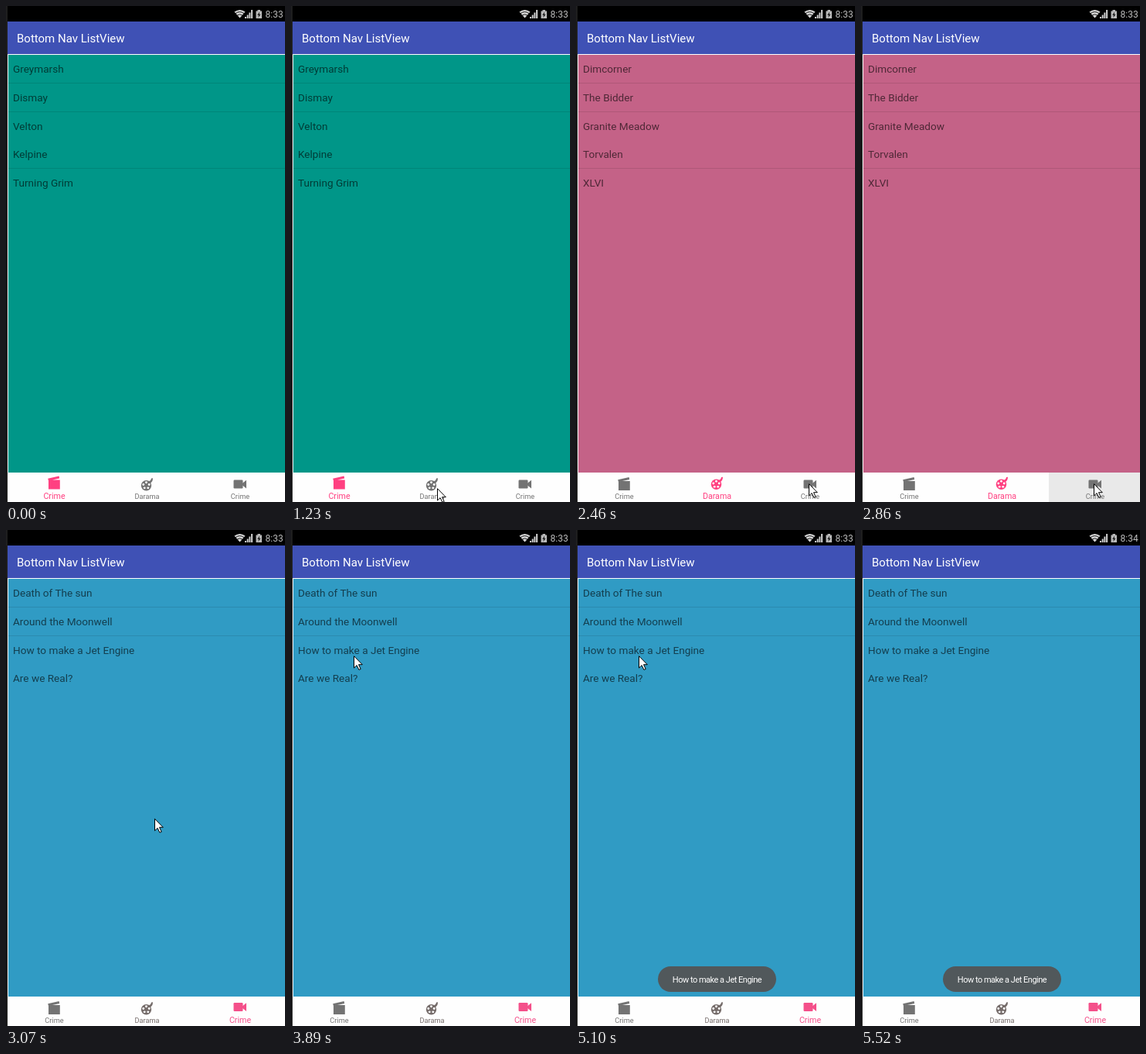
An HTML page for the animation above (6.32 s loop, 361 by 640 pixels).

```html
<!DOCTYPE html>
<html lang="en">
<head>
<meta charset="utf-8">
<title>Bottom Nav ListView</title>
<style>
  html, body { margin: 0; width: 100%; height: 100%; overflow: hidden; background: #fff; }
  svg { display: block; font-family: Roboto, "Noto Sans", sans-serif; }
  .row { font-size: 13.6px; fill: #000; fill-opacity: .6; }
  .tab { fill: currentColor; }
  .tab text { font-size: 9.2px; text-anchor: middle; }
  .tab.on text { font-size: 10.7px; transform: translateY(-.5px); }
  .tab.on .icon { transform: translateY(-1.5px); }
</style>
</head>
<body>
<svg width="361" height="640" viewBox="0 0 361 640">
  <rect width="361" height="640" fill="#fff"/>

  <!-- status bar -->
  <rect width="361" height="20" fill="#000"/>
  <path d="M302.5 15.5 L295.5 7.5 Q302.5 2.5 309.5 7.5 Z" fill="#d8d8d8"/>
  <path d="M297 9.6 Q302.5 5.6 308 9.6 M299.2 12 Q302.5 9.6 305.8 12" fill="none" stroke="#000" stroke-width=".9"/>
  <path d="M309 16 v-2 h2 v2z M311.7 16 v-4.5 h2 v4.5z M314.4 16 v-7.5 h2 v7.5z M317.1 16 v-11 h2 v11z" fill="#d0d0d0"/>
  <path d="M323.5 6.5 h2 v-1.5 h3.5 v1.5 h2 v9.5 h-7.5 z" fill="#b9b9b9"/>
  <path d="M328.2 7.5 l-3 4.2 h1.8 l-.6 3.3 l3.1 -4.3 h-1.9 z" fill="#111"/>
  <text id="clock" x="335.5" y="15" font-size="12" fill="#bdbdbd"></text>

  <!-- app bar -->
  <rect y="20" width="361" height="42" fill="#3f51b5"/>
  <text x="14" y="47" font-size="15" fill="#fff">Bottom Nav ListView</text>

  <g id="pages"></g>

  <g id="toast">
    <rect x="106" y="563" width="153" height="33" rx="16.5" fill="#51585b"/>
    <text x="182.5" y="584" font-size="11" letter-spacing="-.5" text-anchor="middle" fill="#fff">How to make a Jet Engine</text>
  </g>

  <!-- bottom navigation -->
  <rect x="2" y="602" width="359" height="38" fill="#fefefe"/>
  <rect id="press" x="243" y="602" width="118" height="38" fill="#e9e9e9"/>
  <g class="tab">
    <path class="icon" d="M54.2 611.2 L68.6 608 L69.2 611 L60 613 H69.8 V625 H55 V614 Z"/>
    <text x="62.5" y="636">Crime</text>
  </g>
  <g class="tab">
    <g class="icon">
      <circle cx="181.5" cy="618.7" r="6.7"/>
      <path d="M184 613.5 Q187.5 613 188 609.5 L190 609.3 Q190 614.5 186 616 Z"/>
      <g id="holes" fill="#fefefe"></g>
    </g>
    <text x="182.5" y="636">Darama</text>
  </g>
  <g class="tab">
    <g class="icon">
      <rect x="294.5" y="611.5" width="12" height="11" rx="1.2"/>
      <path d="M306 615.8 L311 611.8 V622.4 L306 618.4 Z"/>
    </g>
    <text x="303" y="636">Crime</text>
  </g>

  <rect width="2" height="640" fill="#1e1e1e"/>
  <path id="cursor" d="M.5 .7 V16 L4.1 12.6 L6.9 18.4 L9.2 17.4 L6.5 11.7 H11.3 Z" fill="#fff" stroke="#000"/>
</svg>
<script>
const LOOP = 6320;
const PINK = '#ff4081', GREY = '#737373';
const $ = id => document.getElementById(id);

function add(parent, tag, attrs, text = '') {
  const el = document.createElementNS('http://www.w3.org/2000/svg', tag);
  for (const key in attrs) el.setAttribute(key, attrs[key]);
  el.textContent = text;
  return parent.appendChild(el);
}

const lists = [
  ['#009688', ['Greymarsh', 'Dismay', 'Velton', 'Kelpine', 'Turning Grim']],
  ['#c46287', ['Dimcorner', 'The Bidder', 'Granite Meadow', 'Torvalen', 'XLVI']],
  ['#309bc4', ['Death of The sun', 'Around the Moonwell', 'How to make a Jet Engine', 'Are we Real?']]
];

const pages = lists.map(([color, rows]) => {
  const page = add($('pages'), 'g', {});
  add(page, 'rect', { x: 3, y: 63, width: 358, height: 539, fill: color });
  rows.forEach((name, i) => {
    add(page, 'text', { class: 'row', x: 9, y: Math.round(86.3 + 36.6 * i) }, name);
    // the third divider falls between pixels and does not show
    if (i < rows.length - 1 && i !== 2) {
      add(page, 'rect', { x: 3, y: Math.round(99.2 + 36.6 * i), width: 358, height: 1, fill: '#000', opacity: .11 });
    }
  });
  return page;
});

for (let i = 0; i < 5; i++) {
  const a = (i / 5 - .25) * 2 * Math.PI;
  add($('holes'), 'circle', { cx: 181.5 + 3.9 * Math.cos(a), cy: 618.7 + 3.9 * Math.sin(a), r: 1.45 });
}

// Each track lists [start in ms, value]; values hold until the next start.
const tracks = {
  cursor: [
    [0, null], [200, [178, 506]], [400, [192, 552]], [630, null],
    [1030, [195, 634]], [1230, [189, 622]], [1860, [204, 618]],
    [2040, [271, 612]], [2260, [296, 613]], [2460, [301, 616]],
    [3070, [192, 372]], [3260, [99, 239]], [3460, [68, 192]],
    [3660, [74, 167]], [3890, [81, 162]], [5300, [12, 323]], [5520, null]
  ],
  page: [[0, 0], [1860, 1], [3070, 2]],
  tint: [
    [0, [PINK, GREY, GREY]], [1860, ['#8a6472', '#e8417f', GREY]],
    [2040, [GREY, PINK, GREY]], [3070, [GREY, '#756c6a', '#f4508a']]
  ],
  press: [[0, 0], [2860, 1], [3070, 0]],
  toast: [[0, 0], [4700, .3], [4920, .7], [5100, 1]],
  clock: [[0, '8:33'], [5300, '8:34']]
};

const at = (name, t) => tracks[name].findLast(([start]) => start <= t)[1];
const tabs = document.querySelectorAll('.tab');

function draw() {
  const t = performance.now() % LOOP;
  const current = at('page', t), tint = at('tint', t), tip = at('cursor', t);
  pages.forEach((page, i) => page.setAttribute('display', i === current ? 'inline' : 'none'));
  tabs.forEach((tab, i) => {
    tab.classList.toggle('on', i === current);
    tab.style.color = tint[i];
  });
  $('cursor').setAttribute('display', tip ? 'inline' : 'none');
  if (tip) $('cursor').setAttribute('transform', `translate(${tip})`);
  $('press').setAttribute('opacity', at('press', t));
  $('toast').setAttribute('opacity', at('toast', t));
  $('clock').textContent = at('clock', t);
  requestAnimationFrame(draw);
}
draw();
</script>
</body>
</html>
```
